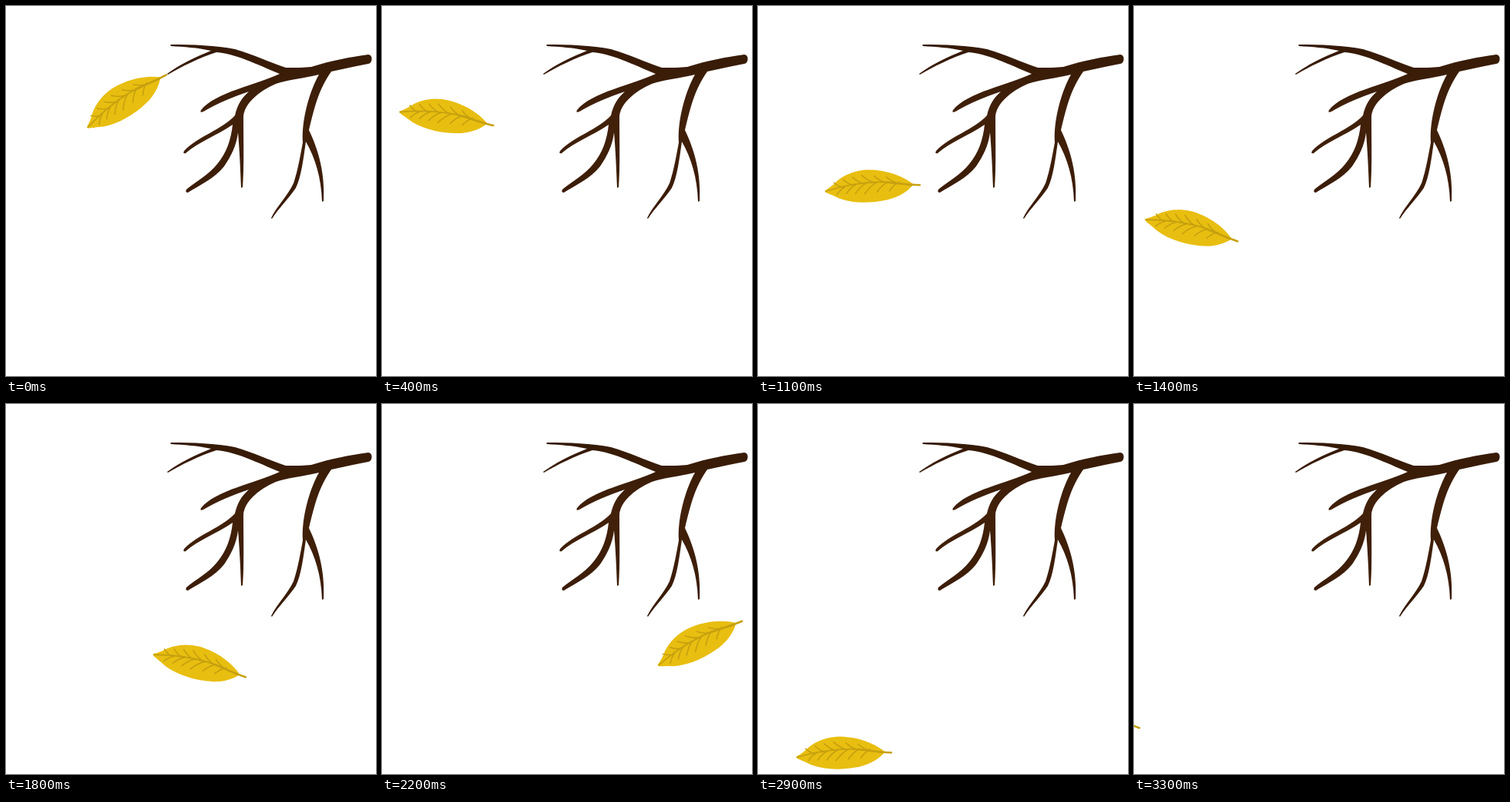
These frames come from a looping animation (480x480 px, 3.4 s). An HTML page:

```html
<!DOCTYPE html>
<html lang="en">
<head>
<meta charset="utf-8">
<title>Falling leaf</title>
<style>
  html, body { margin: 0; width: 100%; height: 100%; overflow: hidden; background: #fff; }
  svg { display: block; width: 100vw; height: 100vh; }
  .vein { fill: none; stroke: #c6a00f; stroke-linecap: round; }
</style>
</head>
<body>
<svg viewBox="0 0 480 480">
  <defs>
    <linearGradient id="bark" x1="0" y1="0" x2="0" y2="1">
      <stop offset="0" stop-color="#351a06"/>
      <stop offset=".4" stop-color="#42210a"/>
      <stop offset="1" stop-color="#391b06"/>
    </linearGradient>
  </defs>
  <path id="branch" fill="url(#bark)" d="
    M470 63 C476 63 476 74 470 75 C452 78 438 82 422 85
    C406 108 401 128 393 161 C405 186 414 216 412 253 L410 254
    C409 222 401 197 389 176 C386 197 383 222 376 236 C365 252 354 262 345 276 L344 275
    C351 260 365 247 373 230 C379 212 382 193 385 177 C383 146 395 108 406 89
    C385 94 364 96 350 101 C327 111 309 127 308 144 C308 178 309 208 307 235 L305 236
    C304 210 303 188 301 164 C299 181 292 195 283 208 C270 224 252 232 236 242 Q232 242 234 238
    C247 227 263 219 274 205 C286 191 292 173 294 154
    C272 169 250 176 233 191 Q229 192 231 188 C249 169 281 160 297 142
    C300 129 305 120 315 111 C294 118 275 126 256 137 Q251 139 253 135
    C271 112 326 102 355 88 C326 76 298 62 273 60
    C249 68 229 78 210 89 L209 88 C228 74 247 66 266 58
    C248 54 231 53 214 52 Q212 50 215 50 C242 50 272 51 297 56
    C321 63 342 73 363 80 C377 80 387 80 396 79 C421 71 447 66 470 63 Z"/>
  <g id="leaf">
    <path fill="#e8be10" d="M-62 -1 C-56 -4 -50 -8 -46 -12 C-35 -20 -21 -24 -7 -24
      C18 -23 40 -13 53 -1 C44 9 29 16 12 17.5 C-10 20 -34 17 -49 8 C-54 5 -60 3 -62 1 Q-63 0 -62 -1 Z"/>
    <path class="vein" stroke-width="1.8" d="M-61 0 C-40 -5 -15 -8 8 -7 C24 -6 37 -3 50 0"/>
    <path class="vein" stroke-width="2.6" d="M18 -6 C32 -4 45 -1 61 0.5"/>
    <path class="vein" id="veins" stroke-width="1.6"/>
  </g>
</svg>
<script>
  const LOOP = 3400, STEP = 100;

  // time, centre x, centre y, tilt in degrees
  const poses = [
    [0, 157, 123, -34], [200, 119, 142, -15], [400, 84, 146, 8], [500, 96, 150, 11],
    [600, 124, 157, 7], [700, 157.5, 164, 1], [900, 200, 181, -11], [1100, 149, 236, -4],
    [1200, 122, 263.5, 0], [1400, 75, 291, 13], [1500, 77, 299, 16], [1600, 115, 306, 17],
    [1800, 251.5, 339.5, 13.5], [2000, 367, 336, -12], [2200, 413, 310, -28],
    [2400, 357, 377, -30], [2500, 320, 401.5, -26], [2700, 222, 442, -13],
    [2900, 112, 455, -3], [3000, 67, 444, 12], [3100, 26, 432, 15], [3300, -52, 404, 15]
  ];

  const slope = (i, k) => {
    const a = poses[Math.max(i - 1, 0)], b = poses[Math.min(i + 1, poses.length - 1)];
    return (b[k] - a[k]) / (b[0] - a[0]);
  };

  // smooth curve through the poses
  function poseAt(t) {
    let i = 0;
    while (i < poses.length - 2 && t >= poses[i + 1][0]) i++;
    const a = poses[i], b = poses[i + 1], d = b[0] - a[0], u = (t - a[0]) / d;
    const u2 = u * u, u3 = u2 * u, s = 3 * u2 - 2 * u3;
    return [1, 2, 3].map(k =>
      a[k] * (1 - s) + b[k] * s +
      d * ((u3 - 2 * u2 + u) * slope(i, k) + (u3 - u2) * slope(i + 1, k)));
  }

  let veins = "";
  for (let i = 0; i < 6; i++) {
    const x = -40 + i * 14, y = -7 + x * x / 500, size = 1 - Math.abs(i - 3) * 0.12;
    veins += `M${x} ${y}q${-7 * size} ${-2 * size} ${-15 * size} ${-10 * size}`;
    veins += `M${x + 4} ${y}q${-8 * size} ${3 * size} ${-17 * size} ${14 * size}`;
  }
  document.getElementById("veins").setAttribute("d", veins);

  const leaf = document.getElementById("leaf");
  const start = performance.now();
  function draw(now) {
    const t = Math.floor((Math.max(now - start, 0) % LOOP) / STEP) * STEP;
    const [x, y, tilt] = poseAt(t);
    leaf.setAttribute("transform", `translate(${x} ${y}) rotate(${tilt})`);
    requestAnimationFrame(draw);
  }
  draw(start);
</script>
</body>
</html>
```
